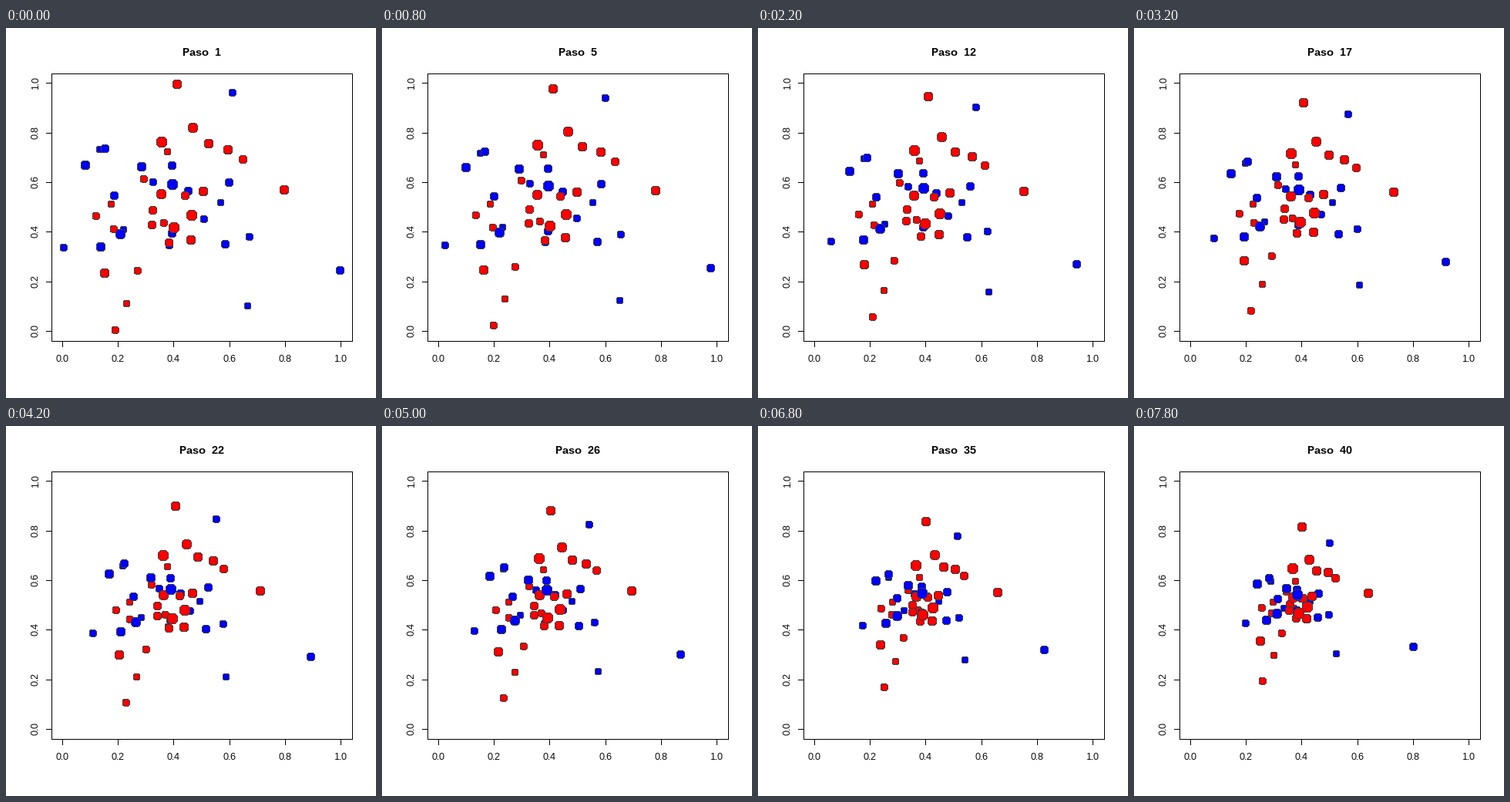
Animation of 480 by 480 pixels, one loop 8000 ms. Source, as a matplotlib script:

```python
import math

import matplotlib.pyplot as plt
from matplotlib.animation import FuncAnimation
from matplotlib.patches import Circle

SIZE, DPI = 480, 100
STEPS, STEP_MS = 40, 200
PX = 72 / DPI  # points per pixel

CENTER = 210 + 228j  # where every dot drifts to
REACH = 210          # distance at which the pull has halved
BLUE, RED = "#0000ff", "#ff0000"
PULL = {BLUE: 1.72, RED: 1.42}

# start points (x + yj, pixels) by colour and radius, lowest layer first
START = {
    (BLUE, 4.5): [121+157j, 278+226j, 313+360j, 152+261j],
    (RED, 4.5): [209+160j, 136+228j, 156+357j],
    (BLUE, 5): [294+84j, 191+200j, 257+248j, 316+271j, 75+285j, 212+282j],
    (RED, 5): [179+196j, 117+244j, 205+253j, 140+261j, 171+315j, 142+392j],
    (BLUE, 5.5): [128+156j, 215+178j, 289+200j, 236+211j, 140+217j,
                  284+280j, 433+314j, 215+266j],
    (RED, 5.5): [307+170j, 232+217j, 190+236j, 189+255j, 211+278j],
    (BLUE, 6): [103+178j, 176+180j, 123+284j],
    (RED, 6): [222+73j, 263+150j, 288+158j, 361+210j, 256+212j, 240+275j,
               128+318j],
    (BLUE, 6.5): [148+267j],
    (RED, 6.5): [242+129j, 201+215j],
    (BLUE, 7): [216+203j],
    (RED, 7): [202+148j, 241+243j, 218+259j],
}

plt.rcParams.update({
    "font.family": "Liberation Sans",
    "text.hinting": "native",
    "text.hinting_factor": 1,
})

fig = plt.figure(figsize=(SIZE / DPI, SIZE / DPI), dpi=DPI, facecolor="white")
ax = fig.add_axes([0, 0, 1, 1])
ax.set(xlim=(0, SIZE), ylim=(SIZE, 0))
ax.axis("off")


def line(xs, ys):
    ax.plot(xs, ys, color="black", lw=PX, antialiased=False,
            solid_capstyle="projecting", solid_joinstyle="miter")


def label(x, y, text, px=12, **kw):
    return ax.text(x, y, text, fontsize=px * PX, ha="center", **kw)


def disc(color, radius, z):
    return ax.add_patch(Circle((0, 0), radius, facecolor=color, linewidth=0,
                               antialiased=False, snap=False, zorder=z))


class Dot:
    """A rimmed disc that glides towards the centre, slower when far or big."""

    def __init__(self, start, color, radius, z):
        self.half = radius % 1
        self.start = start + self.half * (1 + 1j)
        gap = CENTER - self.start
        pull = PULL[color] / math.sqrt(radius)
        self.path = gap * pull / (1 + (abs(gap) / REACH) ** 2)
        self.discs = disc("#3c3c3c", radius, z), disc(color, radius - 1, z)

    def move(self, t):
        p = self.start + self.path * t
        center = [round(v - self.half) + self.half for v in (p.real, p.imag)]
        for d in self.discs:
            d.center = center


line([59, 449, 449, 59, 59], [59, 59, 406, 406, 59])
for i in range(6):
    x, y = round(72.6 + 72.36 * i), round(393 - 64.36 * i)
    line([x, x], [406, 413])
    line([52, 59], [y, y])
    label(x, 433, f"{i / 5:.1f}", va="baseline")
    label(38, y - 0.5, f"{i / 5:.1f}", va="center", rotation=90)
title = label(254, 36, "", px=14, weight="bold", va="baseline")

dots = [Dot(p, color, radius, 10 + layer)
        for layer, ((color, radius), points) in enumerate(START.items())
        for p in points]


def draw(step):
    title.set_text(f"Paso  {step + 1}")
    for dot in dots:
        dot.move(step / (STEPS - 1))
    return [title]


anim = FuncAnimation(fig, draw, frames=STEPS, interval=STEP_MS,
                     repeat=True, repeat_delay=0)
plt.show()
```
